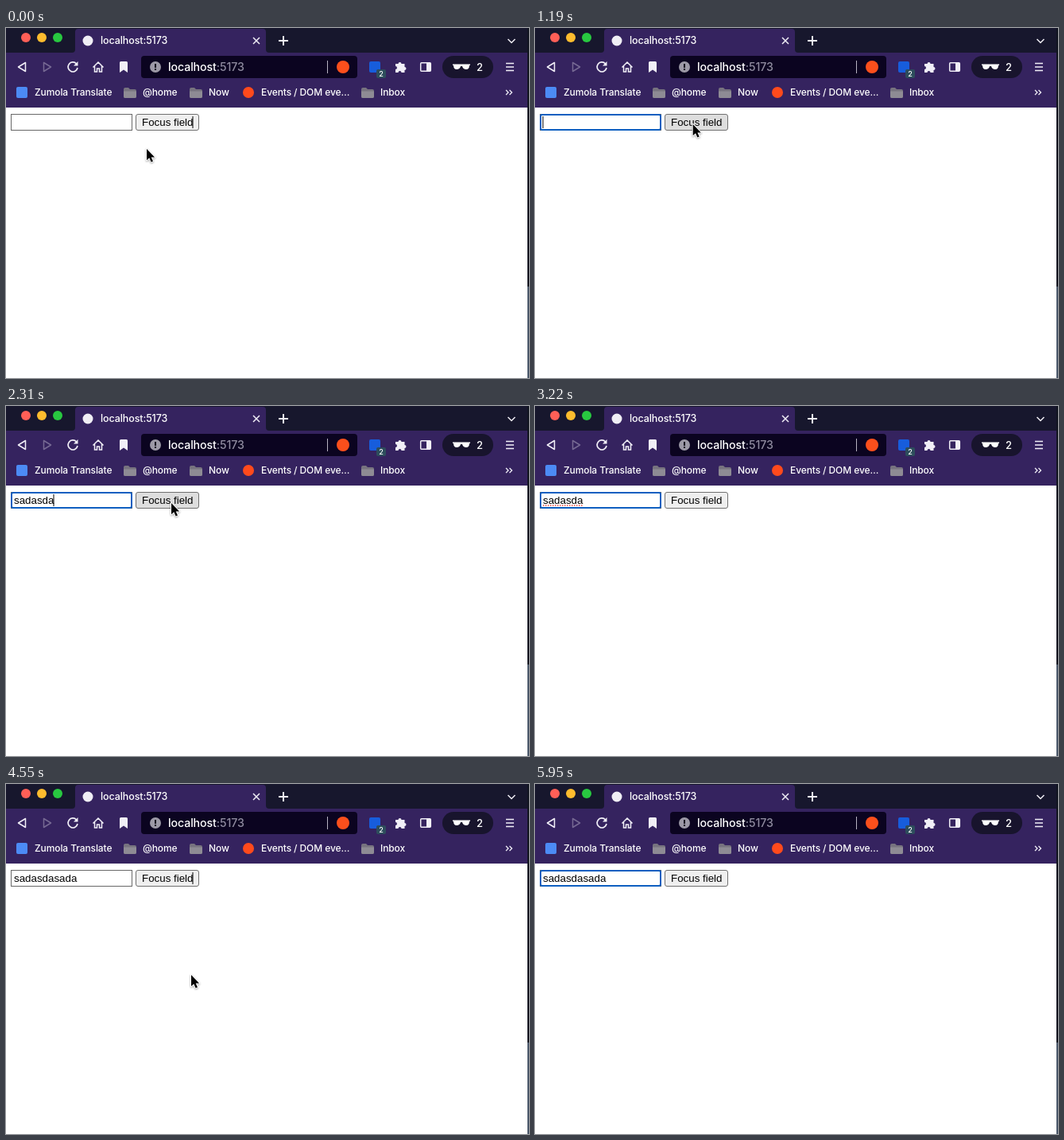
An HTML page that plays this animation: 658x440 px, repeating every 6020 ms.

```html
<!DOCTYPE html>
<html lang="en">
<head>
<meta charset="utf-8">
<title>Focus field</title>
<style>
  html, body { margin: 0; width: 100%; height: 100%; overflow: hidden; background: #fff; }
  svg { display: block; width: 658px; height: 440px; }
  .ui { font: 500 12px Inter, "Open Sans", sans-serif; letter-spacing: -.1px; fill: #fff; }
  .page { font: 13.333px "Liberation Sans", Arial, sans-serif; fill: #000; }
  .line { fill: none; stroke: #f1eff7; stroke-width: 1.5; }
  .caret { fill: #000; }
</style>
</head>
<body>
<svg viewBox="0 0 658 440" xmlns="http://www.w3.org/2000/svg">
  <defs>
    <g id="folder">
      <path d="M0 2q0-2 2-2h4l2 2h6q2 0 2 2v7q0 2-2 2H2q-2 0-2-2z" fill="#77737f"/>
      <path d="M0 4.5h16V11q0 2-2 2H2q-2 0-2-2z" fill="#8e8b94"/>
    </g>
  </defs>

  <rect width="658" height="440" fill="#fff"/>
  <rect width="658" height="31" fill="#17172d"/>
  <rect y="31" width="658" height="69" fill="#35235f"/>
  <path d="M83 31q4 0 4-4V5q0-4 4-4h232q4 0 4 4v22q0 4 4 4z" fill="#35235f"/>

  <!-- tab strip -->
  <circle cx="25" cy="12" r="6" fill="#ff5f57"/>
  <circle cx="45" cy="12" r="6" fill="#febc2e"/>
  <circle cx="65" cy="12" r="6" fill="#28c840"/>
  <circle cx="103" cy="16" r="6.5" fill="#f0eef5"/>
  <text class="ui" x="119" y="20" style="font-size:12.5px">localhost:5173</text>
  <path class="line" d="M311 12l8 8m0-8l-8 8"/>
  <path class="line" d="M343 16h12m-6-6v12" style="stroke-width:2"/>
  <path class="line" d="M631.5 14l4.5 4.5 4.5-4.5"/>

  <!-- toolbar -->
  <path class="line" d="M24.5 43.5v11L15.5 49z" stroke-linejoin="round"/>
  <path class="line" d="M47.5 43.5v11l9-5.5z" stroke-linejoin="round" opacity=".35"/>
  <path class="line" d="M88.6 45A6 6 0 1 0 90 50" style="stroke-width:1.7"/>
  <path d="M90.5 42v5.5H85z" fill="#f1eff7"/>
  <path class="line" d="M109.5 49.5L116 43l6.500 6.500M111.500 48v7h3v-4h3v4h3v-7"/>
  <path d="M143 43.500q0-1.500 1.500-1.500h7q1.500 0 1.500 1.500V56l-5-3.500-5 3.500z" fill="#f1eff7"/>
  <rect x="170" y="35" width="272" height="28" rx="4" fill="#0b0420"/>
  <circle cx="188" cy="49" r="7" fill="#9c99a6"/>
  <path d="M187 45h2v5h-2zm0 6h2v2h-2z" fill="#0b0420"/>
  <text class="ui" x="204" y="54" style="font-size:14.2px">localhost<tspan fill="#8f8b9f">:5173</tspan></text>
  <rect x="404" y="41" width="1" height="16" fill="#b7b3c2"/>
  <circle cx="424" cy="49" r="8" fill="#fb4f1c"/>
  <rect x="457" y="42" width="14" height="14" rx="2" fill="#175ddc"/>
  <rect x="466" y="52" width="12" height="11" rx="2" fill="#2d4d5c"/>
  <text class="ui" x="472" y="61" text-anchor="middle" style="font-size:9px">2</text>
  <path d="M490 45h3.500a2 2 0 1 1 4 0h4v4a2 2 0 1 1 0 4v3h-4a2 2 0 0 0-4 0H490v-4a2 2 0 0 0 0-4z" fill="#f1eff7"/>
  <rect class="line" x="521.700" y="43.700" width="12.600" height="10.600" rx="1"/>
  <rect x="529" y="44" width="5" height="10" fill="#f1eff7"/>
  <rect x="549" y="35" width="64" height="28" rx="14" fill="#18142d"/>
  <path d="M562 45.500h22v1.500h-1q0 5-4 5t-5-4h-2q-1 4-5 4t-4-5h-1z" fill="#fff"/>
  <text class="ui" x="592" y="53.500" style="font-size:13px">2</text>
  <path class="line" d="M629 44.500h10m-10 4.500h10m-10 4.500h10"/>

  <!-- bookmarks -->
  <rect x="13" y="74" width="14" height="14" rx="2" fill="#4c8bf5"/>
  <use href="#folder" x="148" y="75"/>
  <use href="#folder" x="231" y="75"/>
  <circle cx="305" cy="81" r="7" fill="#ff4a1c"/>
  <use href="#folder" x="447" y="75"/>
  <g class="ui">
    <text x="36" y="85">Zumola Translate</text>
    <text x="172" y="85">@home</text>
    <text x="255" y="85">Now</text>
    <text x="321" y="85">Events / DOM eve…</text>
    <text x="471" y="85">Inbox</text>
  </g>
  <path class="line" d="M629 78l3 3-3 3m4.500-6l3 3-3 3" style="stroke-width:1.300"/>

  <!-- desktop edge -->
  <rect x="656" width="2" height="325" fill="#10131f"/>
  <rect x="656" y="325" width="2" height="115" fill="#4b586a"/>

  <!-- page -->
  <rect id="box" x="6.500" y="108.500" width="152" height="20" fill="#fff" stroke="#686868"/>
  <rect id="ring" x="7" y="109" width="151" height="19" rx="2" fill="none" stroke="#0f5fc0" stroke-width="2"/>
  <text id="value" class="page" x="10" y="123"></text>
  <path id="spell" d="M10 125H61" stroke="#e8473f" stroke-width="1.500" stroke-dasharray="1.500 1.500"/>
  <rect id="fieldCaret" class="caret" y="111" width="1" height="15"/>
  <rect id="button" x="163.500" y="108.500" width="79" height="20" rx="2.500" stroke="#707070"/>
  <text class="page" x="171" y="123">Focus field</text>
  <rect id="buttonCaret" class="caret" x="234.500" y="111" width="1" height="15"/>

  <g id="arrow">
    <path d="M0 0v14.200l3.300-3 2.300 5.200 2.400-1-2.300-5h4.400z" fill="#000" stroke="#fff" stroke-width="2" paint-order="stroke" stroke-linejoin="round" style="filter:drop-shadow(0 1px 1px rgba(0,0,0,.35))"/>
  </g>
  <g id="beam" fill="none">
    <path d="M-3-7.500q3 0 3 2v11q0 2-3 2M3-7.500q-3 0-3 2v11q0 2 3 2M-2 2.500h4" stroke="#fff" stroke-width="2.500"/>
    <path d="M-3-7.500q3 0 3 2v11q0 2-3 2M3-7.500q-3 0-3 2v11q0 2 3 2M-2 2.500h4" stroke="#000" stroke-width="1.100"/>
  </g>
</svg>
<script>
  const LOOP = 6020, STEP = 70;
  const word = "sadasdasada";
  const keys = [1330, 1470, 1610, 1750, 1890, 2030, 2170, 3500, 3640, 3780, 3920];
  const clicks = [[0, false], [1050, true], [2660, true], [4410, false], [5390, true]];
  const hidden = [[3010, 4060], [5670, LOOP]];
  const path = [
    [0, 177, 152], [700, 179, 154], [980, 204, 120], [1120, 200, 121],
    [1820, 155, 121], [1960, 155, 121], [2310, 208, 122], [4060, 209, 122],
    [4410, 233, 240], [4690, 233, 240], [5250, 206, 120], [LOOP, 206, 120]
  ];

  const $ = id => document.getElementById(id);
  const show = (id, on) => $(id).setAttribute("visibility", on ? "visible" : "hidden");
  const within = (t, [from, to]) => t >= from && t < to;

  function pointer(t) {
    const i = path.findIndex(p => p[0] > t);
    const [t0, x0, y0] = path[i - 1], [t1, x1, y1] = path[i];
    const u = (t - t0) / (t1 - t0), e = u * u * (3 - 2 * u);
    return [x0 + (x1 - x0) * e, y0 + (y1 - y0) * e];
  }

  function draw(t) {
    const typed = keys.filter(k => k <= t);
    const [clicked, focused] = clicks.filter(c => c[0] <= t).pop();
    const lastInput = Math.max(clicked, typed.length ? typed[typed.length - 1] : 0);
    const caretOn = (t - lastInput) % 1000 < 500;

    const value = $("value");
    value.textContent = word.slice(0, typed.length);
    const end = 10 + (typed.length ? value.getComputedTextLength() : 0);
    $("fieldCaret").setAttribute("x", Math.round(end) - 0.5);
    show("fieldCaret", focused && caretOn);
    show("buttonCaret", !focused && caretOn);
    show("ring", focused);
    show("spell", within(t, [2660, 3500]));

    const [x, y] = pointer(t);
    const visible = !hidden.some(h => within(t, h));
    const inRow = visible && y >= 108 && y < 129;
    const onField = inRow && x >= 6 && x < 159;
    const onButton = inRow && x >= 163 && x < 243;
    const place = `translate(${x.toFixed(1)} ${y.toFixed(1)})`;
    $("arrow").setAttribute("transform", place);
    $("beam").setAttribute("transform", place);
    show("arrow", visible && !onField);
    show("beam", onField);
    $("button").setAttribute("fill", onButton ? "#dedede" : "#efefef");
  }

  const start = performance.now();
  function tick() {
    const t = (performance.now() - start) % LOOP;
    draw(Math.floor(t / STEP) * STEP);
    requestAnimationFrame(tick);
  }
  tick();
</script>
</body>
</html>
```
